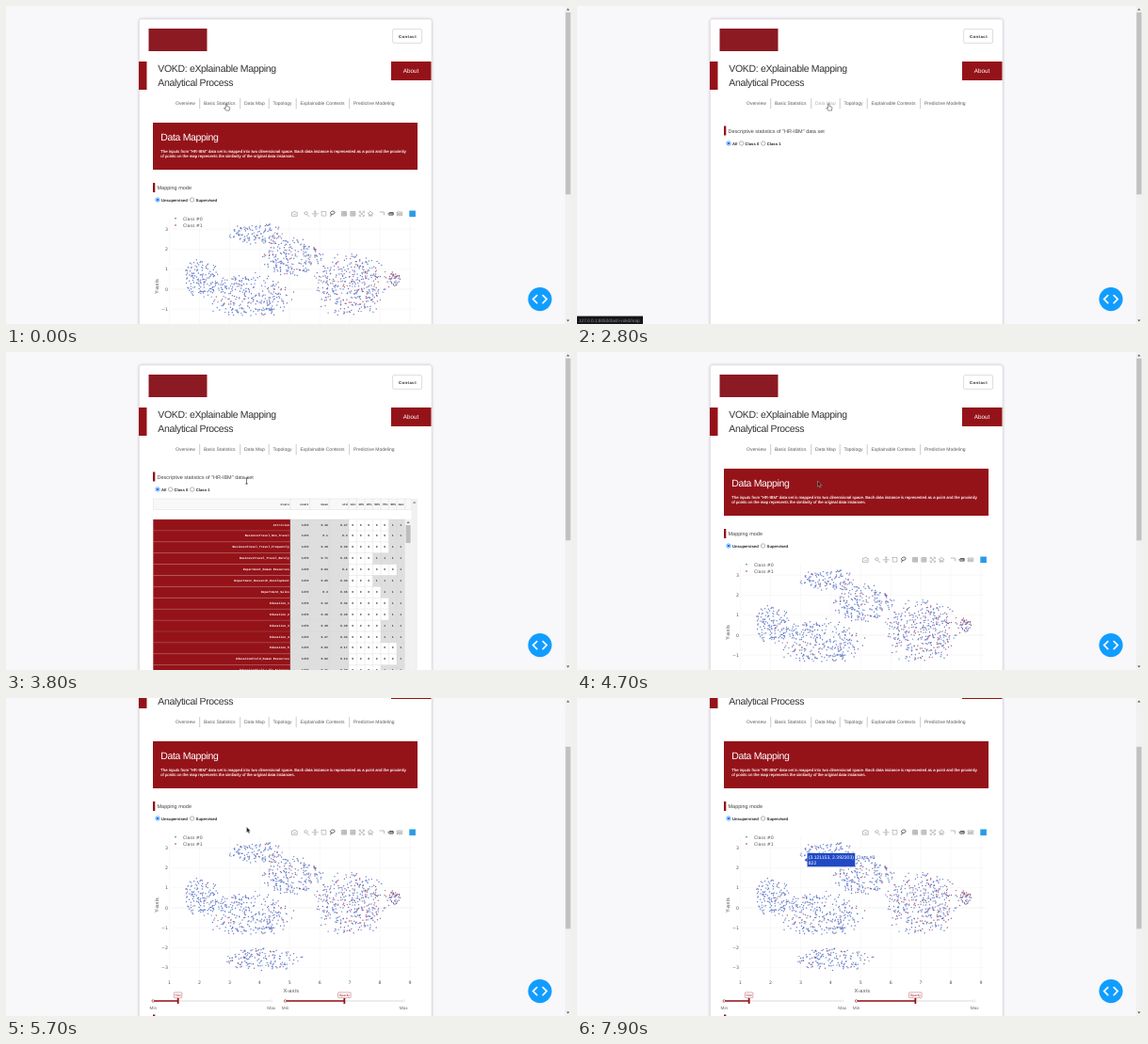
An HTML page for the animation above (8 s loop, 600x338 px).

```html
<!DOCTYPE html>
<html lang="en">
<head>
<meta charset="utf-8">
<title>Data mapping dashboard</title>
<style>
  html, body { margin: 0; width: 100%; height: 100%; overflow: hidden; background: #f8f7fa; }
  svg { display: block; width: 100%; height: 100%; font-family: "Liberation Sans", Arial, sans-serif; }
  text { white-space: pre; text-rendering: geometricPrecision; }
  .card { fill: #fff; stroke: #dcdbe0; stroke-width: .5; filter: drop-shadow(0 0 1.6px rgba(0, 0, 0, .22)); }
  .title { font-size: 10.5px; letter-spacing: -.33px; fill: #333; }
  .heading { font-size: 5.53px; fill: #444; }
  .note { font-size: 4.3px; fill: #fff; stroke: #fff; stroke-width: .1; }
  .nav { font-size: 5px; fill: #5c5c5c; }
  .nav.hover { fill: #b0b0b0; }
  .bold { font-size: 4.2px; font-weight: bold; fill: #222; }
  .plot { font: 4.69px "DejaVu Sans", Verdana, sans-serif; fill: #555; }
  .axis { font-size: 5.47px; }
  .small { font-size: 4.7px; fill: #666; }
  .tip { font-size: 5.08px; fill: #fff; }
  .table { font: bold 3.15px "Liberation Mono", monospace; fill: #333; }
  .middle { text-anchor: middle; }
  .end { text-anchor: end; }
  .light { fill: #fff; }
  .line { fill: none; stroke-linecap: round; }
</style>
</head>
<body>
<svg id="stage" viewBox="0 0 600 338"></svg>
<script>
const LOOP = 8000, STEP = 100;
const NAME = "VOKD";
const HOST = "127.0.0.1:8050/dash-vokd/";
const RED = "#941319";
const CLASS_COLORS = ["#3f5cbc", "#a83340"];
const stage = document.getElementById("stage");

const range = (from, to) => Array.from({ length: to - from + 1 }, (_, i) => from + i);
const rect = (x, y, w, h, fill, extra = "") =>
  `<rect x="${x}" y="${y}" width="${w}" height="${h}" fill="${fill}" ${extra}/>`;
const circle = (x, y, r, fill, extra = "") => `<circle cx="${x}" cy="${y}" r="${r}" fill="${fill}" ${extra}/>`;
const label = (x, y, s, cls = "", extra = "") => `<text x="${x}" y="${y}" class="${cls}" ${extra}>${s}</text>`;
const path = (d, stroke, width, extra = "") =>
  `<path class="line" d="${d}" stroke="${stroke}" stroke-width="${width}" ${extra}/>`;
const shape = (d, fill, extra = "") => `<path d="${d}" fill="${fill}" ${extra}/>`;
const group = (id, body) => `<g id="${id}">${body}</g>`;

function radio(x, y, text, on) {
  return circle(x, y, 2.2, "#fff", `stroke="${on ? "#0075ff" : "#777"}" stroke-width=".55"`)
    + (on ? circle(x, y, 1.35, "#0075ff") : "")
    + label(x + 4, y + 2, text, "bold");
}

const heading = (y, text) => rect(156, y, 2.3, 10, RED) + label(160.5, y + 7.1, text, "heading");

function header() {
  const links = [["Overview", 180], ["Basic Statistics", 210], ["Data Map", 253], ["Topology", 283.5],
    ["Explainable Contexts", 312.5], ["Predictive Modeling", 369]];
  return rect(141.5, 14, 310.5, 700, "#fff", 'rx="2.5" class="card"')
    + rect(151.5, 24, 62, 24, "#8c1a22")
    + rect(410.6, 24.6, 31, 14.8, "#fff", 'rx="1.5" stroke="#bbb" stroke-width=".5"')
    + label(426.5, 33.6, "Contact", "bold middle", 'letter-spacing=".5"')
    + rect(141, 59, 8.5, 30, RED)
    + rect(409, 59, 42.5, 20, RED)
    + label(430, 71.3, "About", "light middle", 'font-size="6.3"')
    + label(161.3, 70.3, `${NAME}: eXplainable Mapping`, "title")
    + label(161.3, 85.2, "Analytical Process", "title")
    + links.map(([s, x], i) => label(x, 105.1, s, "nav", `id="nav${i}"`)
      + (i ? path(`M${x - 4.3} 98.5v10.4`, "#999", .5) : "")).join("");
}

// Each row is a yes/no column: its mean alone gives the deviation and the quantiles.
function statsTable() {
  const means = {
    Attrition: .16, BusinessTravel_Non_Travel: .1, BusinessTravel_Travel_Frequently: .19,
    BusinessTravel_Travel_Rarely: .71, "Department_Human Resources": .04,
    Department_Research_Development: .65, Department_Sales: .3, Education_1: .12, Education_2: .19,
    Education_3: .39, Education_4: .27, Education_5: .03, "EducationField_Human Resources": .02,
    "EducationField_Life Sciences": .41 };
  const quantiles = { min: 0, "10%": .1, "25%": .25, "50%": .5, "75%": .75, "90%": .9, max: 1 };
  const left = 156.3, wideX = i => 302 + i * 20.6, cellX = i => 364 + i * 8.5;
  const columns = [...range(0, 2).map(wideX), ...range(0, 7).map(cellX)];
  const rules = (y, h) => path(columns.map(x => `M${x} ${y}v${h}`).join(""), "#d2d2d2", .35);

  let s = rect(left, 156, 274, 11.4, "#f8f8f8", 'stroke="#d5d5d5" stroke-width=".4"')
    + rect(430.4, 156, 6.6, 190, "#f1f1f1") + shape("M432 160.8l1.7-2 1.7 2z", "#888")
    + ["stats", "count", "mean", "std"].map((h, i) => label(wideX(i) - 1.2, 163, h, "table end")).join("")
    + Object.keys(quantiles).map((h, i) => label(cellX(i) + 7.4, 163, h, "table end")).join("")
    + rules(156, 11.4);

  Object.entries(means).forEach(([name, mean], r) => {
    const y = 178 + r * 11.9, base = y + 6.5;
    const std = Math.sqrt(mean * (1 - mean)).toFixed(2).replace(/0$/, "");
    s += rect(left, y, 146, 11.9, RED) + rect(302, y, 62, 11.9, "#dedede")
      + label(wideX(0) - 1.2, base, name, "table end", 'style="fill:#fff"')
      + [1470, mean, std].map((v, i) => label(wideX(i + 1) - 1.2, base, v, "table end")).join("");
    Object.values(quantiles).forEach((q, i) => {
      const value = q >= 1 - mean ? 1 : 0;
      s += (value ? rect(cellX(i), y, 8.5, 11.9, "#dedede") : "")
        + label(cellX(i) + 4.3, base, value, "table middle");
    });
    s += path(`M${left} ${y}H302`, "#b9686c", .35) + path(`M302 ${y}H424`, "#cfcfcf", .35);
  });
  return s + rules(178, 170) + rect(424, 178, 6.2, 170, "#f1f1f1")
    + rect(424.6, 184, 5, 19, "#bdbdbd") + shape("M425.4 182l1.7-2 1.7 2z", "#777");
}

const dataX = v => 141.6 + 31.93 * v;
const dataY = v => 301 - 21.25 * v;

function scatter() {
  let seed = 20;
  const random = () => {
    seed = (seed * 1664525 + 1013904223) % 4294967296;
    return seed / 4294967296;
  };
  // Ellipses: centre x, centre y, radius x, radius y.
  const lobes = [[207, 289, 18, 18], [267, 242, 28, 11], [304, 266, 30, 19], [258, 308, 43, 21],
    [367, 298, 36, 31], [413, 289, 6, 8], [274, 356, 37, 11]];
  const dots = ["", ""];
  for (const [cx, cy, rx, ry] of lobes) {
    for (let n = rx * ry * .32 + 25; n > 0; n--) {
      const angle = random() * 2 * Math.PI, r = Math.sqrt(random()) * (.85 + random() * .35);
      const x = cx + rx * r * Math.cos(angle), y = cy + ry * r * Math.sin(angle);
      const redShare = .05 + .3 * ((x - 190) / 230) ** 2;
      dots[random() < redShare ? 1 : 0] += `M${x.toFixed(1)} ${y.toFixed(1)}h0`;
    }
  }
  return dots.map((d, i) => path(d, CLASS_COLORS[i], 1.45, 'opacity=".78"')).join("");
}

function modebar() {
  const dark = 'style="stroke:#444"', filled = 'style="fill:#ccc"';
  const square = "M-2.3-2.3h4.6v4.6h-4.6z";
  const groups = [
    [["M-2.7-1.5h1.5l.5-1h1.4l.5 1h1.5v4h-5.4zM-.9.5h1.8"]],
    [["M-2-.6a1.6 1.6 0 1 0 3.2 0a1.6 1.6 0 1 0-3.2 0M.8.8l2 2"],
      ["M-3 0h6M0-3v6M-1-2l1-1 1 1M-1 2l1 1 1-1"],
      [square, 'stroke-dasharray=".9 .9"'],
      ["M-2 2.5l.6-2.2C-4-1-1-3 1-2.7S3 1-1.2.6", dark]],
    [[square + "M-1.5 0h3M0-1.5v3", filled],
      [square + "M-1.5 0h3", filled],
      ["M-2.6-1.2v-1.4h1.4M2.6-1.2v-1.4h-1.4M-2.6 1.2v1.4h1.4M2.6 1.2v1.4h-1.4M-1.5-1.5l3 3M1.5-1.5l-3 3"],
      ["M-2.8 0l2.8-2.6 2.8 2.6M-1.8 0v2.4h1.2v-1.5h1.2v1.5h1.2v-2.4"]],
    [["M-2.5-1.8h4.5v3", 'stroke-dasharray="1.2 .6"'],
      ["M-2.8 0l1.2-1.3h4v2.6h-4zM-1.5 0h3.6", dark],
      ["M-2.7-1.8h5.4v1.3h-5.4zM-2.7.6h5.4v1.3h-5.4z"]]];
  let x = 306.5, s = "";
  for (const icons of groups) {
    for (const [d, extra = ""] of icons) {
      s += path(d, "#b0b0b0", .85, `transform="translate(${x} 220.8)" ${extra}`);
      x += 9.3;
    }
    x += 3.1;
  }
  return s + rect(428.3, 217.5, 6.6, 6.6, "#2a9be8");
}

function slider(x, value, name) {
  const end = x + 125.5, handle = x + 125.5 * value, w = name.length * 1.7 + 1.6;
  return path(`M${x} 400H${end}`, "#e6e6e6", 1.4) + path(`M${x} 400H${handle}`, RED, 1.4)
    + circle(x, 400, 1.3, "#fff", `stroke="${RED}" stroke-width=".6"`)
    + circle(end, 400, 1.2, "#fff", 'stroke="#ddd" stroke-width=".6"')
    + rect(handle - .9, 396.8, 1.8, 6.2, RED)
    + rect(handle - w / 2, 390.9, w, 5.8, "#fff", `rx=".8" stroke="${RED}" stroke-width=".35"`)
    + label(handle, 395, name, "middle", `font-size="3.3" fill="${RED}"`)
    + label(x, 409, "Min", "small middle") + label(end, 409, "Max", "small middle");
}

function plot() {
  const columns = range(1, 9).map(v => path(`M${dataX(v)} 226V375`, "#f0f0f3", .45)
    + label(dataX(v), 381.8, v, "plot middle"));
  const rows = range(-3, 3).map(v => path(`M176 ${dataY(v)}H433`, v ? "#f0f0f3" : "#e6e6ea", .45)
    + label(172, dataY(v) + 1.7, String(v).replace("-", "−"), "plot end"));
  const legend = CLASS_COLORS.map((color, i) => path(`M180 ${225.7 + i * 7.3}h0`, color, 1.6)
    + label(188, 227.5 + i * 7.3, `Class #${i}`, "plot"));
  return [...columns, ...rows, scatter(), modebar(), ...legend].join("")
    + label(302.8, 390.5, "X-axis", "plot axis middle")
    + label(0, 0, "Y-axis", "plot axis middle", 'transform="translate(161.7 298) rotate(-90)"')
    + slider(156.3, .21, "Size") + slider(296.6, .5, "Opacity") + heading(414.5, "Selection");
}

const mapHead = rect(156, 124, 281, 50, RED)
  + label(164.2, 142.5, "Data Mapping", "title", 'style="fill:#fff"')
  + label(164.2, 155.8, 'The inputs from "HR-IBM" data set is mapped into two dimensional space. Each data instance is represented as a point and the proximity', "note")
  + label(164.2, 161, "of points on the map represents the similarity of the original data instances.", "note")
  + heading(188, "Mapping mode")
  + radio(161, 206, "Unsupervised", true) + radio(197.6, 206, "Supervised");

const statsHead = heading(127.5, 'Descriptive statistics of "HR-IBM" data set')
  + radio(161, 146, "All", true) + radio(174.6, 146, "Class 0") + radio(197.8, 146, "Class 1");

const tooltip = rect(0, 0, 51.2, 14.8, "#2049c4", 'stroke="#fff" stroke-width=".4"')
  + shape("M.2 5.2l-2.8 2.2 2.8 2.2z", "#2049c4")
  + label(1.5, 6.1, "", "tip", 'id="tipPoint"')
  + label(1.5, 12.5, "", "tip", 'id="tipId"')
  + label(52.4, 6.1, "Class #0", "tip", `style="fill:${CLASS_COLORS[0]}"`);

const cursors = group("hand", shape("M-.7 0q.7-.7 1.4 0v2.6l2.2.5q.8.3.7 1.1l-.5 2.9h-3.6l-2-2.7q.1-.9 1.8.3z",
  "#fff", 'stroke="#222" stroke-width=".5" stroke-linejoin="round"'))
  + group("arrow", shape("M0 0v6.2l1.4-1.3 1 2.2 1-.5-1-2.1h1.9z", "#222", 'stroke="#fff" stroke-width=".3"'))
  + group("beam", path("M-1-3h2M0-3v6M-1 3h2", "#222", .6));

stage.innerHTML = group("page", header()
    + group("stats", statsHead + group("table", statsTable()))
    + group("map", mapHead + group("plot", plot())))
  + group("tip", tooltip)
  + rect(593.7, 0, 6.3, 338, "#f1f1f1")
  + rect(594.2, 6.8, 5.3, 193.5, "#c1c1c1", 'id="thumb"')
  + shape("M595.2 4.5l1.6-2 1.6 2zM595.2 333.5l1.6 2 1.6-2z", "#555")
  + circle(567, 311.6, 12.6, "#119dff")
  + path("M563.7 307.6l-4 4 4 4M570.2 307.6l4 4-4 4", "#fff", 1.7)
  + group("status", rect(0, 329.6, 79, 8.4, "#17151a", 'id="statusBox"')
    + label(2, 335.6, "", "small", 'id="statusText" style="fill:#8d8b90"'))
  + group("cursor", cursors);

const el = Object.fromEntries([...stage.querySelectorAll("[id]")].map(e => [e.id, e]));

const progress = (t, from, to) => Math.min(1, Math.max(0, (t - from) / (to - from)));
const easeOut = k => 1 - (1 - k) ** 2;
const show = (node, on) => node.setAttribute("visibility", on ? "inherit" : "hidden");
const move = (node, x, y) => node.setAttribute("transform", `translate(${x} ${y})`);

function drawPage(t) {
  const onStats = t >= 600 && t < 4100;
  show(el.stats, onStats);
  show(el.table, onStats && t >= 2900);
  show(el.map, !onStats);
  show(el.plot, t < 600 || t >= 4500);

  const offset = 26.4 * easeOut(progress(t, 4900, 5300)) + 51.6 * easeOut(progress(t, 5400, 5700));
  move(el.page, 0, -offset);
  move(el.thumb, 0, offset * .577);
  return offset;
}

function drawPointer(t) {
  const toMap = progress(t, 600, 1000), toText = progress(t, 3000, 3800), toPoint = progress(t, 6000, 6500);
  move(el.cursor, 234 + 33.3 * toMap - 11.8 * toText - 43.5 * toPoint, 104 + 33 * toText + 62 * toPoint);
  const kind = t < 3100 ? "hand" : t >= 3700 && t < 4100 ? "beam" : t < 6500 ? "arrow" : "";
  ["hand", "beam", "arrow"].forEach(id => show(el[id], id === kind));
  el.nav1.classList.toggle("hover", t >= 100 && t < 800);
  el.nav2.classList.toggle("hover", t >= 900 && t < 3100);

  show(el.status, t >= 300 && t < 3800);
  el.status.setAttribute("opacity", t < 400 || t >= 3700 ? .5 : 1);
  el.statusText.textContent = HOST + (t < 1000 ? "statistics" : "map");
  el.statusBox.setAttribute("width", t < 1000 ? 79 : 70);
}

// The hovered point dips below the first one, then climbs to the last.
function drawTooltip(t, offset) {
  const k = progress(t, 6800, 7900);
  const x = 2.178088 + .943065 * k;
  const y = 1.150924 + 1.241379 * k - 4.68 * k * (1 - k);
  show(el.tip, t >= 6500);
  move(el.tip, dataX(x) + 3, dataY(y) - offset - 7.4);
  el.tipPoint.textContent = `(${x.toFixed(6)}, ${y.toFixed(6)})`;
  el.tipId.textContent = Math.round(1384 - 562 * k);
}

function draw(t) {
  const offset = drawPage(t);
  drawPointer(t);
  drawTooltip(t, offset);
}

const start = performance.now();
function frame() {
  const t = (performance.now() - start) % LOOP;
  draw(Math.floor(t / STEP) * STEP);
  requestAnimationFrame(frame);
}
frame();
</script>
</body>
</html>
```
